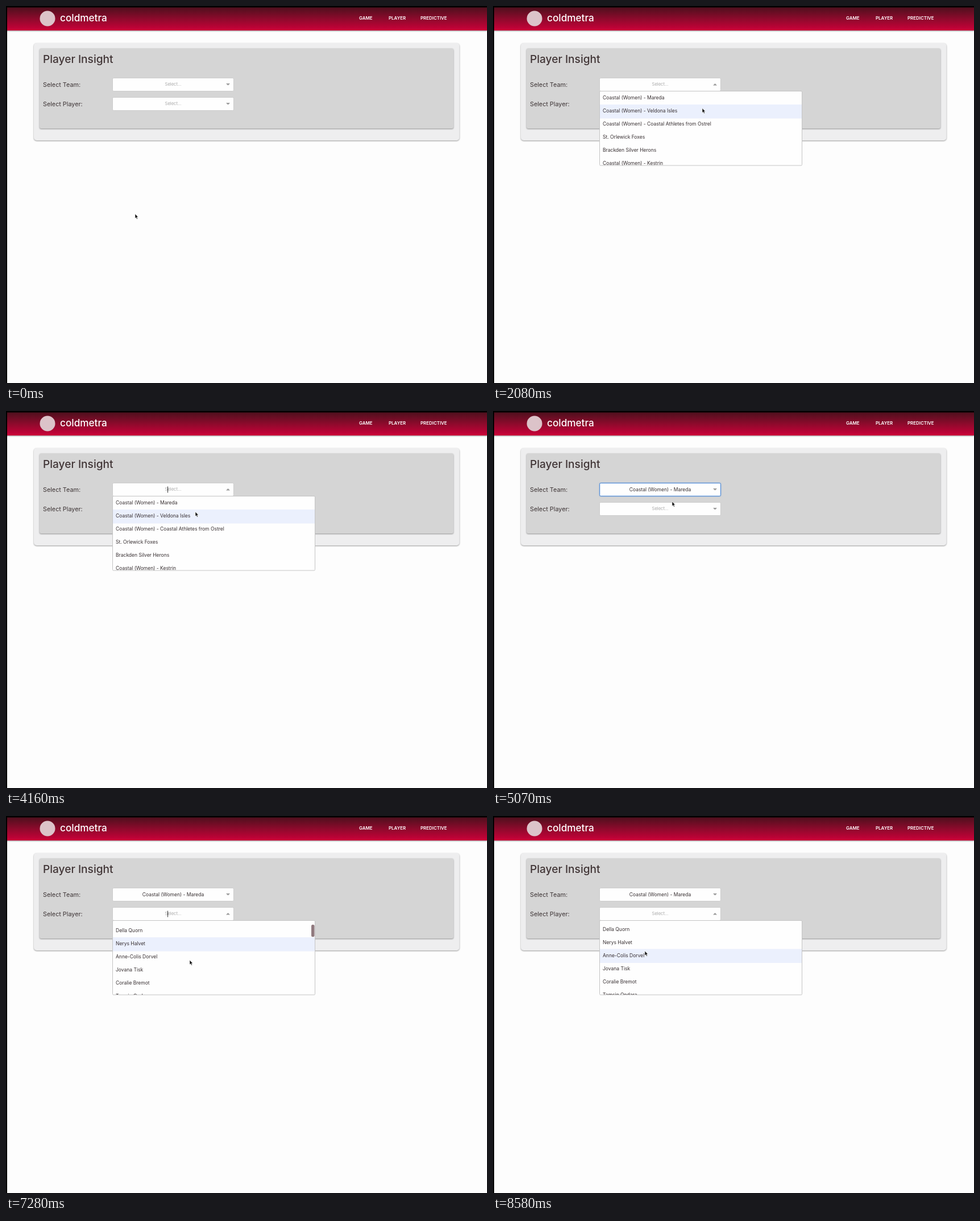
Write an HTML page that moves like this. It is 846 by 662 pixels and loops after 8840 ms.

```html
<!DOCTYPE html>
<html lang="en">
<head>
<meta charset="utf-8">
<title>Player Insight</title>
<style>
  html, body { margin: 0; width: 100%; height: 100%; overflow: hidden; background: #fdfdfd; }
  svg { display: block; font-family: Inter, "Open Sans", sans-serif; }
  .shadow { filter: drop-shadow(0 1px 1px #0006); }
  .brand { font-size: 17.2px; font-weight: 500; fill: #fff; }
  .nav { font-size: 7.9px; font-weight: 600; fill: #fff; }
  .title { font-size: 19.1px; font-weight: 500; fill: #413536; }
  .label { font-size: 10.8px; fill: #3d3435; }
  .item { font-size: 8.5px; fill: #372f31; }
  .value { text-anchor: middle; }
  .hint { font-size: 7.6px; fill: #aaa; }
  .ring { fill: none; stroke: #4f8ad6; filter: drop-shadow(0 0 1px #4f8ad699); }
</style>
</head>
<body>
<svg id="stage" width="846" height="662" viewBox="0 0 846 662">
  <defs>
    <linearGradient id="bar" x2="0" y2="1">
      <stop stop-color="#4d101d"/><stop offset=".5" stop-color="#8d0a2c"/><stop offset="1" stop-color="#cc0039"/>
    </linearGradient>
    <clipPath id="window"><rect x="188" width="355" height="130"/></clipPath>
  </defs>
  <rect width="846" height="662" fill="#fdfdfd"/>
  <rect class="shadow" y="2" width="846" height="41" fill="url(#bar)"/>
  <path d="M0 0H846V2.5H2V662H0Z"/>
  <circle cx="73" cy="22" r="13.5" fill="#dcc3c9"/>
  <text class="brand" x="95" y="27">coldmetra</text>
  <g class="nav">
    <text x="621" y="24.3">GAME</text><text x="673" y="24.3">PLAYER</text><text x="729" y="24.3">PREDICTIVE</text>
  </g>
  <rect class="shadow" x="49" y="65" width="748.5" height="171" rx="5" fill="#eeeeef"/>
  <rect class="shadow" x="59" y="74.5" width="728" height="140.5" rx="3" fill="#d5d5d5"/>
  <text class="title" x="65" y="100">Player Insight</text>
  <g id="selects"></g>
  <g id="lists"></g>
  <path id="arrow" d="M0 0V8L1.8 6.4L3.1 9.2L4.5 8.6L3.2 5.8H5.6Z" fill="#111" stroke="#fff" stroke-width=".6"/>
  <path id="hand" d="M0 1Q1 -1 2 1V4.2L5 5Q6 5.4 5.8 7L5 12H-.6L-3.4 7.4Q-3.6 5.8 -2 6.4L0 8Z" fill="#fff" stroke="#222" stroke-width=".9"/>
</svg>
<script>
const LOOP = 8840, STEP = 130, ROW = 23, VIEW = 130;
const $ = id => document.getElementById(id);

// Each key is [time, ...values], joined by straight lines.
const cursorKeys = [
  [0, 227, 365], [520, 388, 137], [1950, 388, 137], [2210, 348, 222], [3120, 348, 222],
  [3510, 342, 186], [3900, 342, 186], [4680, 315, 159], [5330, 315, 159], [5590, 326, 168],
  [6370, 326, 168], [6630, 323, 253], [7800, 323, 253], [8450, 267, 237]
];

const selects = [
  {
    label: 'Select Team:', y: 138, open: [1300, 5070], focus: [5070, 5980], thumb: [2600, 3510],
    caret: [[1300, 1820], [2210, 2600], [2990, 3510], [4030, 4550]],
    scroll: [[2470, 0], [2600, 6.5], [3900, 6.5], [4160, 0]], content: 137,
    items: ['Coastal (Women) - Mareda', 'Coastal (Women) - Veldona Isles',
      'Coastal (Women) - Coastal Athletes from Ostrel', 'St. Orlewick Foxes',
      'Brackden Silver Herons', 'Coastal (Women) - Kestrin']
  },
  {
    label: 'Select Player:', y: 172, open: [5980, LOOP], focus: [0, 0], thumb: [7020, 7800],
    caret: [[5980, 6500], [7020, 7540], [8060, 8580]],
    scroll: [[6890, 0], [7020, 8], [7150, 22], [7280, 40], [7410, 42.5]], content: 780,
    items: ['Irena Volke', 'Bronagh Tannisven', 'Della Quorn', 'Nerys Halvet',
      'Anne-Colis Dorvel', 'Jovana Tisk', 'Coralie Bremot', 'Tamsin Ondara']
  }
];

function sample(keys, t) {
  const i = keys.findIndex(k => k[0] > t);
  if (i === 0) return keys[0].slice(1);
  if (i < 0) return keys[keys.length - 1].slice(1);
  const a = keys[i - 1], b = keys[i], p = (t - a[0]) / (b[0] - a[0]);
  return a.slice(1).map((v, j) => v + (b[j + 1] - v) * p);
}

const within = (t, [from, to]) => t >= from && t < to;
const show = (el, on) => el.setAttribute('visibility', on ? 'visible' : 'hidden');
const move = (el, x, y) => el.setAttribute('transform', `translate(${x} ${y})`);

function add(parent, tag, attrs, text = '') {
  const el = document.createElementNS('http://www.w3.org/2000/svg', tag);
  for (const name in attrs) el.setAttribute(name, attrs[name]);
  el.textContent = text;
  return parent.appendChild(el);
}

function build(s) {
  const field = add($('selects'), 'g', { transform: `translate(0 ${s.y})` });
  add(field, 'text', { class: 'label', x: 65, y: 4 }, s.label);
  add(field, 'rect', { x: 187.5, y: -11.5, width: 213, height: 23, rx: 2, fill: '#fefefe', stroke: '#ccc' });
  s.ring = add(field, 'rect', { class: 'ring', x: 187.5, y: -11.5, width: 213, height: 23, rx: 2 });
  s.hint = add(field, 'text', { class: 'value hint', x: 294, y: 2.4 }, 'Select...');
  s.value = add(field, 'text', { class: 'item value', x: 294, y: 2.6 }, s.items[0]);
  s.caretLine = add(field, 'path', { d: 'M284.5 -5.5V5.5', stroke: '#333' });
  s.mark = add(field, 'path', { fill: '#999' });

  s.top = s.y + 12;
  s.list = add($('lists'), 'g', { transform: `translate(0 ${s.top})` });
  add(s.list, 'rect', { x: 187.5, y: -.5, width: 356, height: VIEW + .5, rx: 1.5, fill: '#fefefe', stroke: '#c4c4c4' });
  const view = add(s.list, 'g', { 'clip-path': 'url(#window)' });
  s.rows = add(view, 'g', {});
  s.hover = add(s.rows, 'rect', { x: 188, width: 355, height: 24.5, fill: '#ebf0fd' });
  s.items.forEach((name, i) => add(s.rows, 'text', { class: 'item', x: 193, y: i * ROW + 14.3 }, name));
  s.bar = add(s.list, 'rect', { x: 537, width: 5.5, height: VIEW * VIEW / s.content, rx: 2.5, fill: '#90797e' });
}

function update(s, t, cursorY) {
  const open = within(t, s.open), [scroll] = sample(s.scroll, t);
  const chosen = s === selects[0] && t >= s.open[1];
  show(s.list, open);
  show(s.ring, within(t, s.focus));
  show(s.hint, !chosen);
  show(s.value, chosen);
  show(s.caretLine, s.caret.some(span => within(t, span)));
  show(s.bar, within(t, s.thumb));
  s.mark.setAttribute('d', open ? 'M387 1.5H394L390.5 -2Z' : 'M387 -2H394L390.5 1.5Z');

  // The highlight lags one step behind scrolling.
  const [lagged] = sample(s.scroll, t - STEP);
  const row = Math.max(0, Math.floor((cursorY - 1 - s.top + lagged) / ROW));
  s.hover.setAttribute('y', Math.min(row, s.items.length - 1) * ROW);
  move(s.rows, 0, -scroll);
  s.bar.setAttribute('y', scroll * VIEW / s.content);
}

function frame(now) {
  const t = Math.floor(now % LOOP / STEP) * STEP;
  const [x, y] = sample(cursorKeys, t), pointing = within(t, [520, 2080]);
  for (const s of selects) update(s, t, y);
  for (const id of ['arrow', 'hand']) {
    move($(id), x, y);
    show($(id), pointing === (id === 'hand'));
  }
  requestAnimationFrame(frame);
}

selects.forEach(build);
const start = performance.now();
(function tick() { frame.call(null, 0); })();
</script>
</body>
</html>
```
